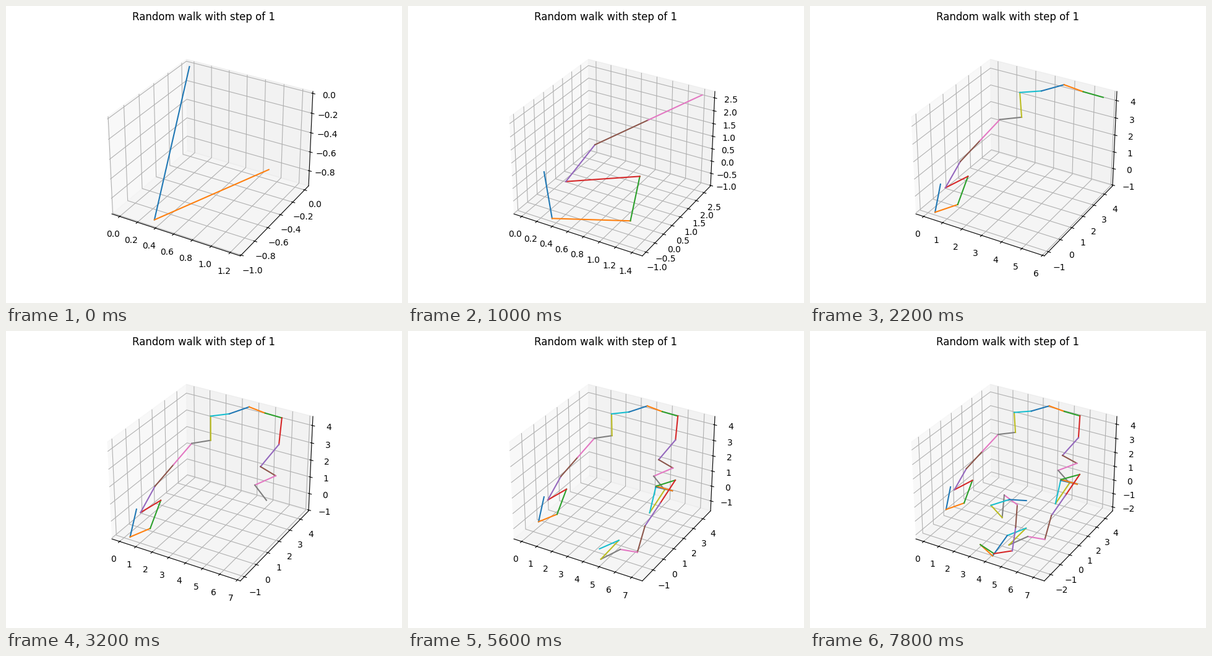
Write a matplotlib script that moves like this. It is 640x480 px and loops after 8 s.

```python
import numpy as np
import matplotlib.pyplot as plt
from matplotlib.animation import FuncAnimation
from matplotlib.ticker import MaxNLocator

FRAMES = 40
INTERVAL = 200

# The walk takes one unit step per heading (degrees)
HEADINGS = [
    -70.5, 28, 96, 216, 81.5, 61, 61, 16, 126, 14, 24, -4, -1, -64,
    -118, -9, -151, -22, -107, 105, 2, 180, 24, -107, -108, -79, 185, 213,
    57, 210, -109, 164, -10, 19, 112, 117, 167, -64, 160, 26, 9]

# Share of the data range left free at each end of an axis
WIDE_PAD = (1.1 * 25 / 24 - 1) / 2
TIGHT_PAD = 1 / 48


def walk_points(headings):
    """Vertices of the walk; y and z always advance together."""
    angle = np.radians(headings)
    steps = np.column_stack([np.cos(angle), np.sin(angle), np.sin(angle)])
    return np.vstack([np.zeros(3), steps.cumsum(axis=0)])


def padded(values, pad):
    low, high = values.min(), values.max()
    margin = pad * (high - low)
    return low - margin, high + margin


walk = walk_points(HEADINGS)

fig = plt.figure(figsize=(6.4, 4.8), dpi=100)
fig.suptitle("Random walk with step of 1", y=0.982)
ax = fig.add_subplot(projection="3d")
for axis in (ax.xaxis, ax.yaxis, ax.zaxis):
    axis.set_major_locator(MaxNLocator(nbins=9, steps=[1, 2, 2.5, 5, 10]))

segments = [ax.plot(*walk[i:i + 2].T, color=f"C{i % 10}")[0]
            for i in range(len(HEADINGS))]


def update(frame):
    """Show the steps taken so far and fit the box around them."""
    count = frame + 2
    for i, segment in enumerate(segments):
        segment.set_visible(i < count)
    x, y, z = walk[:count + 1].T
    ax.set_xlim(*padded(x, WIDE_PAD))
    ax.set_ylim(*padded(y, WIDE_PAD))
    ax.set_zlim(*padded(z, TIGHT_PAD))
    return segments


anim = FuncAnimation(fig, update, frames=FRAMES, interval=INTERVAL,
                     init_func=lambda: update(0), repeat=True)
plt.show()
```
